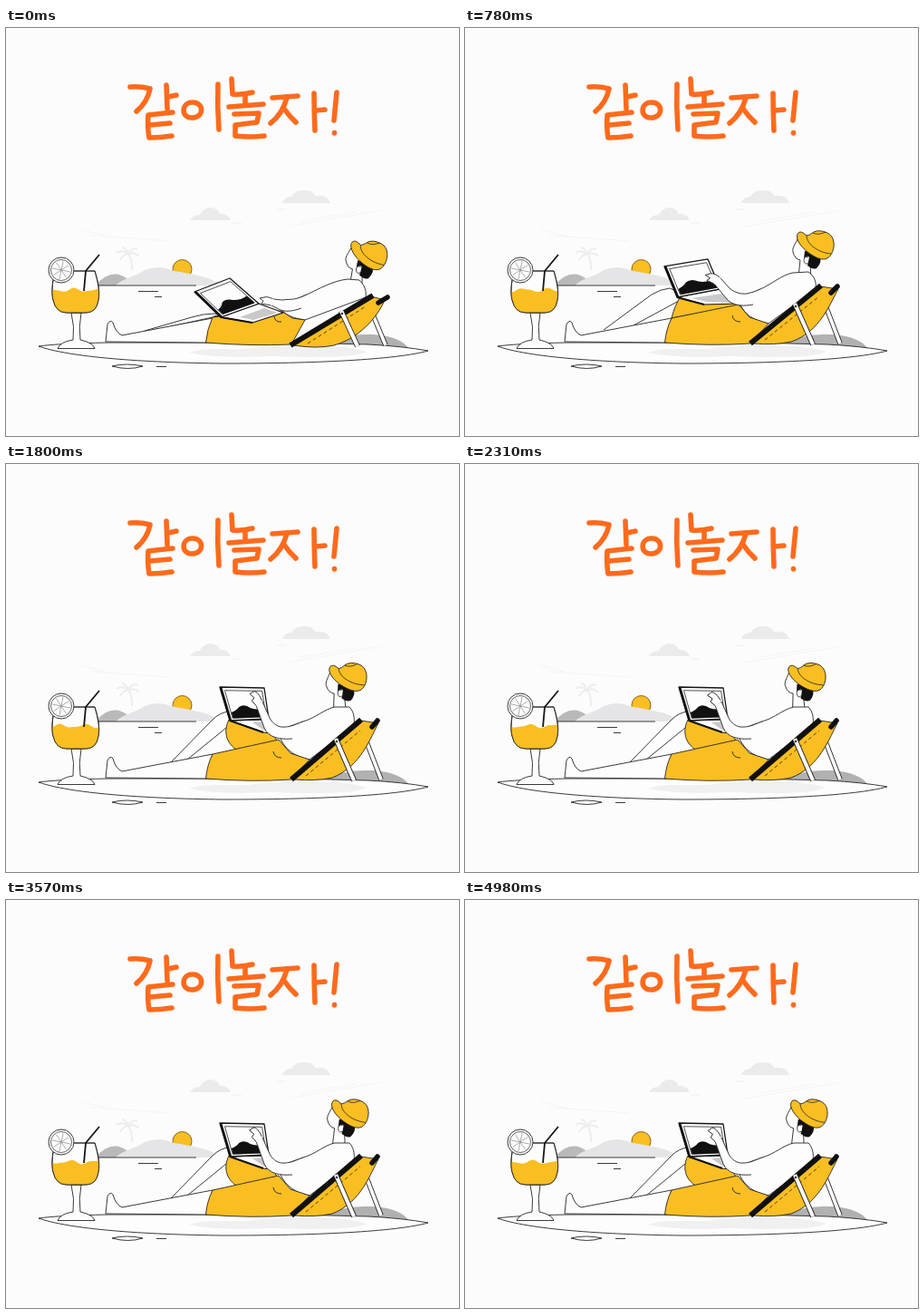
These frames come from a looping animation (500x450 px, 5.01 s). An HTML page with a canvas:

```html
<!DOCTYPE html>
<html lang="ko">
<head>
<meta charset="utf-8">
<title>같이놀자!</title>
<style>
  html, body { margin: 0; width: 100%; height: 100%; overflow: hidden; background: #fcfcfc; }
  canvas { display: block; width: 500px; height: 450px; }
</style>
</head>
<body>
<canvas id="stage" role="img" aria-label="같이놀자!"></canvas>
<script>
const LOOP = 5010, RISE = 1290, MID = 0.655;
const INK = '#252525', PAPER = '#fdfdfd', GOLD = '#f9be22', ORANGE = '#ff6a1c';
const canvas = document.getElementById('stage');
const ctx = canvas.getContext('2d');
const dpr = window.devicePixelRatio || 1;
canvas.width = 500 * dpr;
canvas.height = 450 * dpr;

let weights = [1, 0, 0]; // low, middle and upright pose
const smooth = x => { x = Math.max(0, Math.min(1, x)); return x * x * (3 - 2 * x); };
const numbers = d => d.match(/-?[\d.]+/g).map(Number);

// Blend path strings that share the same structure.
function mix(poses) {
  const lists = poses.map(numbers);
  let i = 0;
  return poses[0].replace(/-?[\d.]+/g, () => {
    const v = lists.reduce((sum, list, k) => sum + list[i] * weights[k], 0);
    i++;
    return v.toFixed(2);
  });
}

function draw(d, fill, stroke = INK, width = 0.9) {
  const path = new Path2D(Array.isArray(d) ? mix(d) : d);
  if (fill) { ctx.fillStyle = fill; ctx.fill(path); }
  if (stroke) { ctx.strokeStyle = stroke; ctx.lineWidth = width; ctx.stroke(path); }
}

function circle(x, y, r, fill, stroke, width) {
  draw(`M${x - r} ${y}a${r} ${r} 0 1 0 ${2 * r} 0a${r} ${r} 0 1 0 ${-2 * r} 0Z`, fill, stroke, width);
}

// A rail with an outline.
function rail(d, width, inner) {
  draw(d, null, INK, width);
  draw(d, null, inner, width - 1.8);
}

// Run a drawing step rotated around a point.
function turned(x, y, angle, step) {
  ctx.save();
  ctx.translate(x, y);
  ctx.rotate(angle);
  ctx.translate(-x, -y);
  step();
  ctx.restore();
}

function title() {
  ctx.lineCap = ctx.lineJoin = 'round';
  const strokes = [
    'M137 65Q149 64 159 67Q156 82 144 92', 'M177 63L178 89M179 76L188 74',
    'M184 93L157 96Q156 110 158 121Q171 121 183 119M159 107L181 105',
    'M206 82C193 82 193 99 205 99C219 99 219 82 206 82', 'M234 62Q233 87 235 112',
    'M249 56L250 73Q261 74 272 71M264 73L264 83M246 87L284 84',
    'M252 95L279 94L277 104L253 107L253 119Q269 121 285 119',
    'M294 77Q307 76 322 75M310 77Q305 95 292 105M307 89Q313 98 320 104',
    'M340 72Q340 92 341 113M342 91L352 90', 'M365 71L362 102M362.5 115.5L362.5 116'
  ];
  strokes.forEach(d => draw(d, null, ORANGE, 5.6));
  ctx.lineCap = 'butt';
}

function background() {
  const pale = '#ededee';
  draw('M83 222L112 230M95 229L181 235M309 219L415 201M325 213L386 203', null, '#f3f3f3');
  draw('M203 212Q206 206 214 206Q218 198 226 198Q234 199 236 205Q245 204 248 212Z', '#ebebec', null);
  draw('M305 193Q307 186 315 186Q320 178 330 179Q339 179 341 185Q355 183 358 193Z', '#ebebec', null);
  draw('M249 215H260M299 200H309', null, pale);
  draw('M135 249Q140 257 139 267M135 249Q127 244 122 248M135 249Q128 251 126 256M135 249Q132 242 128 242M135 249Q140 241 145 244M135 249Q143 247 147 252', null, pale, 2);
  circle(194.5, 266, 10.5, GOLD, '#765a1c');
  draw('M99 284C106 275 115 270 125 272Q135 275 141 284Z', '#b9b9ba', null);
  draw('M121 284C130 275 145 274 153 267Q168 261 182 267C199 271 225 273 238 284Z', '#e5e5e7', null);
  draw('M99 284H210M146 290.5H168M164 296.5H172', null);
  draw('M340 355C351 343 379 337 405 338Q436 340 446 355Z', '#b1b1b2', null);
  draw('M36 351Q56 348 112 347H318L400 349Q438 351 466 356C430 366 340 370 240 370C150 369 70 363 36 351Z', PAPER);
  draw('M202 358C225 350 245 357 275 353C315 348 380 349 398 357C382 365 330 363 292 362C250 364 220 362 202 358Z', '#f0f0f1', null);
  draw('M117 373Q133 369 151 373Q135 378 117 373ZM166 373.500H177', null);
}

function drink(t) {
  const bowl = 'M54 268C51 281 50 292 52 300Q55 314 67 314H88Q100 314 102 300C104 290 101 278 98 268';
  draw('M72 314Q76 330 74 344Q60 346 57 353.500H98Q96 347 82 344Q80 330 83 314Z', PAPER);
  draw(bowl + 'Z', PAPER);
  let surface = 'M50 320';
  for (let x = 50; x <= 104; x += 2) {
    const y = 289 + 1.8 * Math.sin(x * 0.23 - t * Math.PI * 8 / LOOP) + 0.7 * Math.sin(x * 0.4);
    surface += `L${x} ${y.toFixed(2)}`;
  }
  ctx.save();
  ctx.clip(new Path2D(bowl + 'Z'));
  draw(surface + 'L104 320Z', GOLD, null);
  ctx.restore();
  draw(bowl, null);
  circle(61, 267, 14, PAPER, INK);
  circle(61, 267, 11.5, PAPER, INK, 0.7);
  for (let i = 0; i < 8; i++) {
    const a = i * Math.PI / 4 + 0.2;
    draw(`M61 267L${61 + 10 * Math.cos(a)} ${267 + 10 * Math.sin(a)}`, null, '#888', 0.7);
  }
  draw('M75 268H98', null);
  draw('M86 290L88 268L103 250', null, '#151515', 1.8);
}

function head(t) {
  const [dx, dy, tilt] = numbers(mix(['12 11 4', '0 0 0', '-7.5 -4 -4']));
  const nod = 5 * smooth((t - 2400) / 550);
  ctx.save();
  ctx.translate(dx, dy);
  turned(386, 262, (tilt + nod) * Math.PI / 180, () => {
    draw('M367 233C364 239 361 243 362 247Q364 255 370 256L368 276H382L381 260L392 252Z', PAPER);
    draw('M375 246L374 255Q378 250 380 253L378 262Q384 267 388 265Q394 259 392 253L381 247Z', '#111', null);
    draw('M379 253Q374 251 374 257Q375 262 379 259', PAPER, INK, 0.8);
    draw('M368 226C364 230 368 239 378 247C386 253 394 257 400 254C405 251 408 243 407 236Q406 229 400 226Q391 222 385 225Q380 229 377 229Q371 223 368 226Z', GOLD);
    draw('M377 229C377 239 391 248 404 249M384 226Q390 229 398 225', null, INK, 0.8);
  });
  ctx.restore();
}

function laptop() {
  const c = numbers(mix(['208 291 247 276 279 304 237 319', '220 263 268 255 282 288 234 297', '236 246 285 247 290 281 247 283']));
  const at = (u, v) => [0, 1].map(k =>
    (c[k] * (1 - u) + c[2 + k] * u) * (1 - v) + (c[6 + k] * (1 - u) + c[4 + k] * u) * v).join(' ');
  const poly = pts => 'M' + pts.map(p => at(...p)).join('L') + 'Z';
  draw(['M237 319L279 304L306 314L272 325Z', 'M234 297L282 288L302 304L264 305Z', 'M247 283L288 282L300 298L284 296Z'], PAPER, '#151515', 1.2);
  draw(['M258 319L285 309L300 314L273 322Z', 'M250 298L283 293L295 303L267 302Z', 'M272 285L286 284L296 296L285 294Z'], '#c9c9cb', null);
  draw(['M237 319L272 325', 'M234 297L264 305', 'M247 283L284 296'], null, '#111', 2);
  draw(poly([[0, 0], [1, 0], [1, 1], [0, 1]]), PAPER, '#151515', 1.3);
  draw(poly([[0.09, 0.1], [0.94, 0.1], [0.94, 0.93], [0.09, 0.93]]), PAPER, INK, 0.8);
  draw(`M${at(0.1, 0.76)}Q${at(0.25, 0.7)} ${at(0.32, 0.6)}Q${at(0.46, 0.5)} ${at(0.6, 0.64)}Q${at(0.75, 0.72)} ${at(0.94, 0.66)}L${at(0.94, 0.94)}L${at(0.1, 0.94)}Z`, '#111', null);
  draw(`M${at(0.02, 0)}L${at(0.02, 1)}`, null, '#111', 2.6);
}

function arm(t, rise) {
  draw([
    'M332 294C328 296 325 297 322 298C316 300 310 299 305 300L295 299L293 306L301 310C308 314 318 312 326 309',
    'M326 288C322 290 316 292 311 293C304 294 297 291 293 288L282 276L275 282L289 299C296 307 308 307 318 305',
    'M328 284C322 286 315 290 308 290C300 291 294 286 291 280L283 262L276 266L285 291C290 302 302 304 316 303'
  ], PAPER);
  const [x, y] = numbers(mix(['294 302', '279 279', '279.5 264']));
  const tap = -rise * (1 - Math.cos((t - RISE) * 2 * Math.PI / 690)) * 0.16;
  turned(x, y, tap, () => {
    draw([
      'M295 299C291 297 288 296 285 297L280 298L284 301L282 304L293 306',
      'M282 276C279 272 275 270 272 270L266 271L271 275L267 277L275 282',
      'M283 262C282 256 279 250 276 250L271 252L275 257L272 260L276 266'
    ], PAPER);
    draw(['M295 299L293 306', 'M282 276L275 282', 'M283 262L276 266'], null, PAPER, 2);
  });
}

function person(t, rise) {
  // rear chair leg and cloth
  rail(['M402 309L419 350', 'M394 296L414 348', 'M394 296L414 348'], 5.5, PAPER);
  draw([
    'M318 350L403 296L418 300C413 312 396 340 362 350Q343 354 318 350Z',
    'M318 348L392 285L412 288C404 301 393 335 360 346Q342 350 318 348Z',
    'M318 348L392 283L411 286C403 300 392 334 360 346Q342 350 318 348Z'
  ], GOLD);
  ctx.setLineDash([4, 3]);
  draw(['M333 348L397 307', 'M331 344L391 296', 'M331 344L391 294'], null, '#5b4510', 1);
  ctx.setLineDash([]);
  ctx.lineCap = 'round';
  draw(['M411 303L421 297', 'M404 292L411 285', 'M404 290L410 283'], null, '#101010', 5.5);
  ctx.lineCap = 'butt';

  head(t);
  draw([
    'M377 277C360 279 345 288 332 294C322 298 312 303 306 308L306 313C312 318 318 320 330 322L397 297C398 290 396 284 390 278Z',
    'M362 270C350 272 338 283 326 288C316 293 308 296 305 300L304 305C308 315 318 323 335 326L387 288C388 280 386 274 379 269Z',
    'M363 268C352 270 342 280 328 284C318 288 308 290 303 296L303 303C308 314 318 323 335 326L384 289C385 280 384 273 379 268Z'
  ], PAPER);

  // bent leg
  draw([
    'M153 334L205 319Q218 315 230 315L236 316L228 319L155 335',
    'M153 333L206 294Q216 288 226 287L240 293L236 301L186 328',
    'M180 331L228 282Q236 274 246 273L252 282L243 291L200 326'
  ], PAPER);
  draw([
    'M230 318C230 318 232 320 240 322L300 314L280 312Z',
    'M238 296C234 302 230 311 228 320L305 306L270 296Z',
    'M246 282C240 294 242 308 256 316L300 306L284 284Z'
  ], GOLD);

  // straight leg and shorts
  draw('M110 346L112 327Q115 321 118 325Q121 336 128 339L228 320L222 347Z', PAPER);
  draw([
    'M228 319L304 312L316 320L330 322L315 349Q270 351 220.500 347Q222 332 228 319Z',
    'M228 320L302 305L314 319L335 326L315 348Q270 351 220.500 347Q222 332 228 320Z',
    'M228 320L301 304L314 319L335 326L315 348Q270 351 220.500 347Q222 332 228 320Z'
  ], GOLD);
  draw(['M296 318Q297 325 304 324', 'M295 317Q296 324 304 324', 'M295 317Q296 324 304 324'], null);

  laptop();
  arm(t, rise);

  // front rail and leg of the chair
  draw(['M314 350L405 295', 'M315 348L393 284', 'M315 348L392 282'], null, '#101010', 6);
  rail(['M370 312L388 351', 'M364 304L384 349', 'M364 303L384 349'], 6, PAPER);
  const [x, y] = numbers(mix(['371 315', '365 307', '365 306']));
  circle(x, y, 1.2, INK, null);
}

function frame(now) {
  const t = now % LOOP;
  const e = smooth(t / RISE);
  weights = [(e - 1) * (e - MID) / MID, e * (1 - e) / (MID * (1 - MID)), e * (e - MID) / (1 - MID)];
  ctx.setTransform(dpr, 0, 0, dpr, 0, 0);
  ctx.fillStyle = '#fcfcfc';
  ctx.fillRect(0, 0, 500, 450);
  title();
  background();
  drink(t);
  person(t, e);
  requestAnimationFrame(() => frame(performance.now() - start));
}

const start = performance.now();
frame(0);
</script>
</body>
</html>
```
